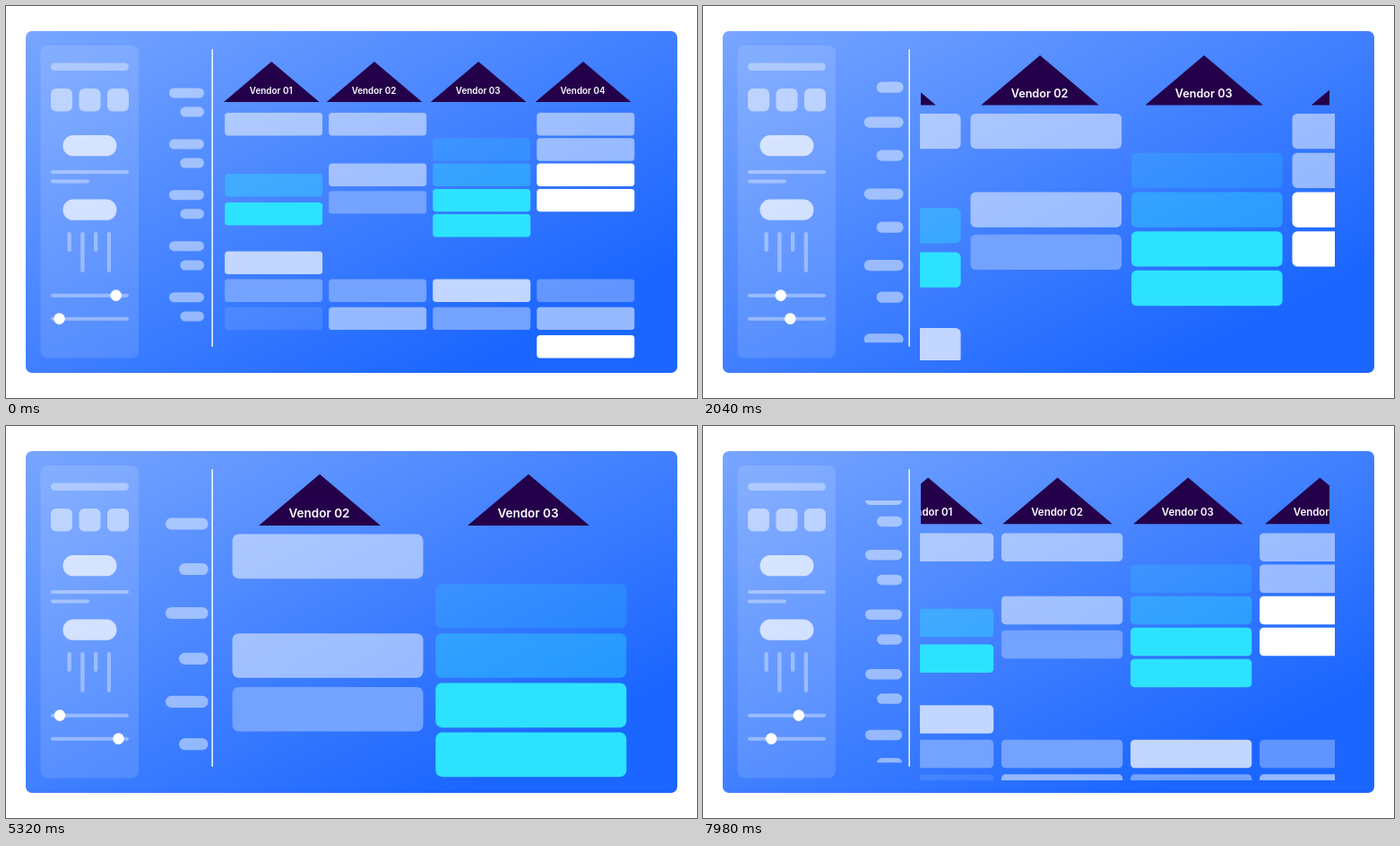
These frames come from a looping animation (771x437 px, 8 s). An HTML page with a canvas:

```html
<!DOCTYPE html>
<html lang="en">
<head>
<meta charset="utf-8">
<title>Vendor comparison</title>
<style>
html, body { margin: 0; width: 100%; height: 100%; overflow: hidden; background: #fff; }
canvas { display: block; width: 771px; height: 437px; }
</style>
</head>
<body>
<canvas id="stage"></canvas>
<script>
const W = 771, H = 437, LOOP = 8000, ZOOM = 3560, HOLD_END = 5320;
const canvas = document.getElementById('stage');
const dpr = window.devicePixelRatio || 1;
canvas.width = W * dpr;
canvas.height = H * dpr;
const ctx = canvas.getContext('2d');

const white = a => `rgba(255,255,255,${a})`;
const cyan = a => `rgba(45,226,255,${a})`;
const PALE = '#c2d6ff', MID = '#73a2ff', DARK = '#24004a';

const lerp = (a, b, k) => a + (b - a) * k;
const easeOut = (p, k) => (1 - Math.exp(-k * p)) / (1 - Math.exp(-k));

// One list per column: [top, fill]
const columns = [
  [[119, white(.52)], [187, cyan(.38)], [219, cyan(1)], [273.6, PALE], [304.6, MID], [335.7, white(.1)]],
  [[119, white(.5)], [175.6, white(.5)], [206.2, MID], [304.6, MID], [335.7, white(.5)]],
  [[147.3, cyan(.19)], [175.6, cyan(.38)], [203.9, cyan(1)], [232.1, cyan(1)], [304.6, PALE], [335.7, MID]],
  [[119, white(.5)], [147.3, white(.5)], [175.6, '#fff'], [203.9, '#fff'], [304.6, white(.3)],
   [335.7, white(.54)], [367, '#fff']]
];

// Centre of each heading when zoomed out and zoomed in
const headings = [[296.2, 118], [411, 350], [527.2, 583], [644, 819.5]];

// Centre height of each axis label when zoomed out and zoomed in
const longLabels = [[97, 33], [154, 109], [210.7, 208.5], [267.7, 307.3], [324.7, 411]];
const shortLabels = [[118, 67.5], [175, 159.5], [231.7, 259.3], [289, 354.7], [346, 476.5]];

function box(x, y, w, h, r, fill) {
  ctx.fillStyle = fill;
  ctx.beginPath();
  ctx.roundRect(x, y, w, h, r);
  ctx.fill();
}

function clipped(x, y, w, h, draw) {
  ctx.save();
  ctx.beginPath();
  ctx.rect(x, y, w, h);
  ctx.clip();
  draw();
  ctx.restore();
}

function knob(x, y) {
  ctx.fillStyle = '#fff';
  ctx.beginPath();
  ctx.arc(x, y, 6.3, 0, Math.PI * 2);
  ctx.fill();
}

function card() {
  const g = ctx.createLinearGradient(22, 28, 335, 626);
  g.addColorStop(0, '#78a6ff');
  g.addColorStop(.83, '#1b66ff');
  box(22, 28, 727, 381, 7, g);
}

function panel(p) {
  box(38.5, 44, 109.5, 348.5, 8, white(.12));
  box(50, 63.5, 87, 8.5, 4.2, white(.36));
  for (let i = 0; i < 3; i++) box(50 + i * 31.5, 92, 24, 25.5, 6, white(.5));
  box(63.5, 144, 60, 23.3, 11.6, white(.7));
  box(50, 183, 87, 4, 2, white(.36));
  box(50, 193.5, 43, 4, 2, white(.36));
  box(63.5, 215.5, 60, 23.3, 11.6, white(.7));
  for (let i = 0; i < 4; i++) box(68.5 + i * 14.75, 252, 4.3, i % 2 ? 45 : 22, 2.1, white(.36));
  box(50, 320.8, 87, 4, 2, white(.36));
  box(50, 346.8, 87, 4, 2, white(.36));
  knob(lerp(122.7, 60, p), 322.6);
  knob(lerp(59.5, 125.5, p), 348.6);
}

function axis(p) {
  const spread = ((1 + .218 * p) * (1 + .426 * p) - 1) / .737;
  const h = lerp(11, 13.2, p), right = lerp(221, 225.6, p);
  const pills = (list, left) => {
    for (const [a, b] of list) box(left, lerp(a, b, spread) - h / 2, right - left, h, h / 2, white(.46));
  };
  clipped(170, 83, 60, 292.3, () => {
    pills(longLabels, lerp(182, 178, p));
    pills(shortLabels, lerp(194.4, 193, p));
  });
  box(229.4, 48, 1.5, 332, .7, white(.92));
}

function blocks(p) {
  const s = lerp(1, 1.954, p), x0 = lerp(476.2, 479.3, p), y0 = lerp(119, 120.6, p);
  clipped(242, 50, 463, 345, () => {
    columns.forEach((column, i) => {
      for (const [y, fill] of column) {
        box(x0 + (i - 2) * 116.05 * s, y0 + (y - 119) * s, 109 * s, 25.4 * s, 3.7 * s, fill);
      }
    });
  });
}

function roofs(p) {
  const grow = easeOut(p, 2.8), size = lerp(9.9, 13.5, easeOut(p, 1.8));
  const half = lerp(53.3, 67.9, grow), top = lerp(62, 53.7, grow), base = lerp(107, 111.1, grow);
  ctx.font = `600 ${size}px Inter, Roboto, sans-serif`;
  ctx.textAlign = 'center';
  ctx.textBaseline = 'alphabetic';
  clipped(243, 40, 456, 80, () => {
    headings.forEach(([a, b], i) => {
      const x = lerp(a, b, p);
      ctx.fillStyle = DARK;
      ctx.beginPath();
      ctx.moveTo(x, top);
      ctx.lineTo(x + half, base);
      ctx.lineTo(x - half, base);
      ctx.fill();
      ctx.fillStyle = '#fff';
      ctx.fillText('Vendor 0' + (i + 1), x - .5, lerp(94, 97.5, grow) + size * .364);
    });
  });
}

function zoomAt(t) {
  if (t < HOLD_END) return Math.min(t / ZOOM, 1);
  return 1 - (t - HOLD_END) / ZOOM;
}

function draw(ms) {
  const p = zoomAt(Math.floor((ms % LOOP) / 20) * 20);
  ctx.setTransform(dpr, 0, 0, dpr, 0, 0);
  ctx.fillStyle = '#fff';
  ctx.fillRect(0, 0, W, H);
  card();
  panel(p);
  axis(p);
  blocks(p);
  roofs(p);
}

const start = performance.now();
function tick(now) {
  draw(Math.max(0, now - start));
  requestAnimationFrame(tick);
}
draw(0);
requestAnimationFrame(tick);
</script>
</body>
</html>
```
